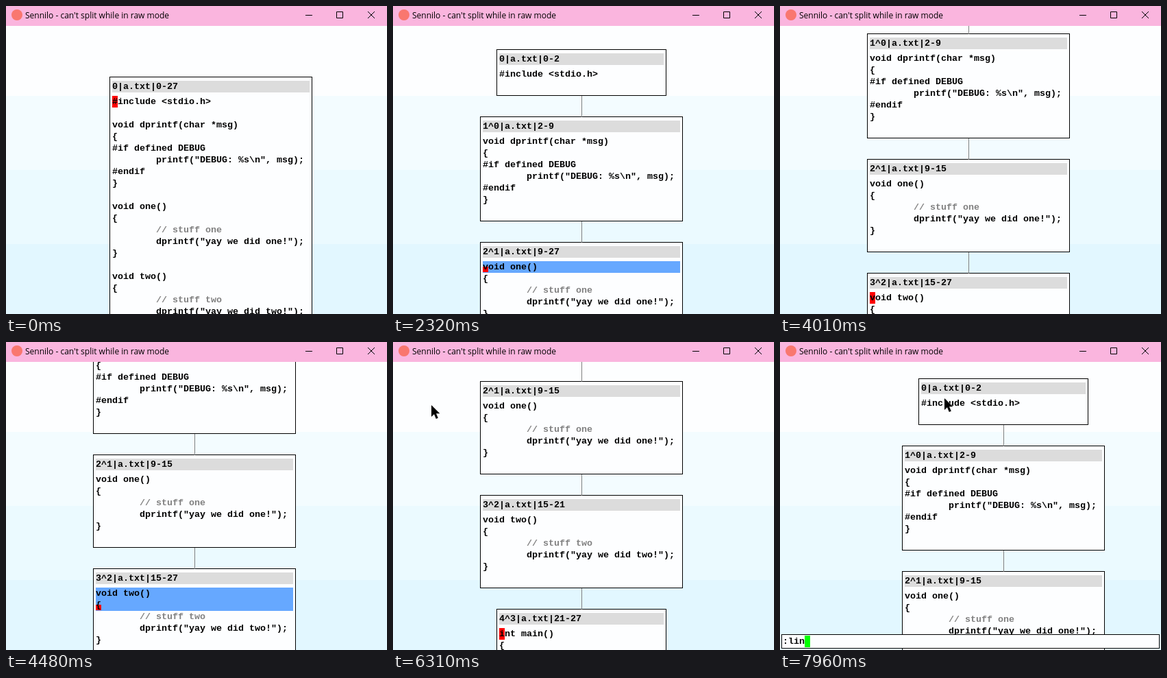
Animation, 556 px wide and 449 px high, one loop 8 s. Source, as an HTML page:

```html
<!DOCTYPE html>
<html lang="en">
<head>
<meta charset="utf-8">
<title>Split editor</title>
<style>
  html, body { margin: 0; width: 100%; height: 100%; overflow: hidden; background: #fff; }
  svg { display: block; }
  text { white-space: pre; }
  .code text { font: bold 13.3333px "Liberation Mono", monospace; }
  .title { font: 12px "Open Sans", "Noto Sans", sans-serif; }
</style>
</head>
<body>
<svg width="556" height="449" viewBox="0 0 556 449">
  <g shape-rendering="crispEdges">
    <rect width="556" height="131" fill="#fdfeff"/>
    <rect y="131" width="556" height="108" fill="#f3fcff"/>
    <rect y="239" width="556" height="108" fill="#ebfaff"/>
    <rect y="347" width="556" height="102" fill="#e2f7ff"/>
  </g>
  <g id="boxes" class="code"></g>
  <g id="command" class="code"></g>
  <rect width="556" height="29" fill="#fab5de"/>
  <circle cx="16" cy="13" r="8" fill="#f9776f"/>
  <text class="title" x="28" y="18">Sennilo - can't split while in raw mode</text>
  <path d="M437 13.5h10M482.5 8.5h9v9h-9zM528 8l10 10M538 8l-10 10" fill="none" stroke="#000"/>
  <path id="mouse" d="M0 0V17L4 13.3 6.8 20 9.8 18.7 7 12.3H12.3Z" stroke="#fff" paint-order="stroke"/>
</svg>
<script>
const LOOP = 8000, CHAR = 8, ROW = 17, PAD = 4, HEAD = 28, GAP = 30;
const LEFT = 151, TOP = 103, LOWEST = 434, KEY = 80, REDRAW = 60;
const TAB = ' '.repeat(8);

const stuff = name => [
  `void ${name}()`, '{', `${TAB}// stuff ${name}`,
  `${TAB}dprintf("yay we did ${name}!");`, '}', ''
];
const LINES = [
  '#include <stdio.h>', '',
  'void dprintf(char *msg)', '{', '#if defined DEBUG',
  TAB + 'printf("DEBUG: %s\\n", msg);', '#endif', '}', '',
  ...stuff('one'), ...stuff('two'),
  'int main()', '{', TAB + 'one();', TAB + 'two();', TAB + 'return 0;', '}'
];
const STARTS = [...LINES.keys()].filter(i => /^(void|int) /.test(LINES[i]));

// Each round scrolls the active box to `top`, selects one function and types a command.
const ROUNDS = [
  { top: 103, reveal: 0, settle: 1, select: 720, done: 1240, colon: 1470, enter: 1770, word: 'spl' },
  { top: 266, reveal: 2080, settle: 3160, select: 2260, done: 2740, colon: 3340, enter: 3760, word: 'spl' },
  { top: 285, reveal: 4010, settle: 5080, select: 4250, done: 4900, colon: 5080, enter: 5500, word: 'spl' },
  { top: 389, reveal: 5620, settle: 5680, select: LOOP, done: LOOP, colon: 7650, enter: 8040, word: 'lin' }
];
const DRAG = { start: 6310, end: 6610, dx: 51, dy: 277 };
const GLIDE = { start: 6650, end: 7090, from: [107, 369], to: [240, 82] };

const clamp = (v, lo, hi) => Math.min(hi, Math.max(lo, v));
const mix = (a, b, p) => a + (b - a) * p;
const easeOut = p => 1 - (1 - p) ** 1.66;
const stepped = (t, a, b) => clamp(Math.floor((t - a) / REDRAW) * REDRAW / (b - a), 0, 1);

function layout(n) {
  const cuts = [0, ...(n ? STARTS.slice(0, n + 1) : []), LINES.length];
  let y = TOP;
  return cuts.slice(0, -1).map((from, i) => {
    const to = cuts[i + 1], lines = LINES.slice(from, to);
    const w = Math.max(30, ...lines.map(s => s.length + 1)) * CHAR + 2 * PAD;
    const h = HEAD + lines.length * ROW + 6;
    const box = { from, to, lines, y, w, h };
    y += h + GAP;
    return box;
  });
}
const LAYOUTS = ROUNDS.map((_, n) => layout(n));
const activeIndex = n => n && n + 1;
const activeBox = n => LAYOUTS[n][activeIndex(n)];
const restingScroll = n => n < 0 ? 0 : ROUNDS[n].top - activeBox(n).y;

function scrollAt(n, t) {
  const { reveal, settle } = ROUNDS[n], before = restingScroll(n - 1);
  if (t < reveal) return before;
  const inView = Math.min(before, LOWEST - (activeBox(n).y + HEAD + ROW));
  return mix(inView, restingScroll(n), easeOut(stepped(t, reveal, settle)));
}

function caretAt(n, t) {
  const { select, done } = ROUNDS[n];
  const first = STARTS[n] - activeBox(n).from;
  if (t < select) return { row: clamp(Math.floor((t - 270) / 180), 0, n ? 0 : first) };
  const moves = STARTS[n + 1] - STARTS[n] - 1;
  const p = clamp((t - select) / (done - select), 0, 1);
  return { row: first + Math.floor(moves * p), anchor: first };
}

const escapeText = s => s.replace(/&/g, '&amp;').replace(/</g, '&lt;');
const rect = (x, y, w, h, fill) =>
  `<rect x="${x}" y="${y}" width="${w}" height="${h}" fill="${fill}"/>`;
const frame = (x, y, w, h) =>
  `<rect x="${x + .5}" y="${y + .5}" width="${w - 1}" height="${h - 1}" fill="#fdfeff" stroke="#000"/>`;
const label = (x, y, s) =>
  `<text x="${x}" y="${y + 12}" fill="${s.trim().startsWith('//') ? '#808080' : '#000'}">${escapeText(s)}</text>`;

function drawCaret(x, top, w, { row, anchor }) {
  const y = top + row * ROW;
  if (anchor === undefined) return rect(x, y, CHAR, ROW, '#f00');
  return rect(x, top + anchor * ROW, w, (row - anchor + 1) * ROW, '#66a8ff')
    + rect(x, y + 8, CHAR, 8, '#f00');
}

function drawBoxes(n, t) {
  const drag = stepped(t, DRAG.start, DRAG.end);
  const dx = Math.round(DRAG.dx * drag);
  const dy = Math.round(scrollAt(n, t) + DRAG.dy * drag);
  const center = LEFT + dx + LAYOUTS[n][0].w / 2;

  return LAYOUTS[n].map((box, i) => {
    const { from, to, lines, w, h } = box;
    const x = center - w / 2 + PAD, y = box.y + dy, inner = w - 2 * PAD;
    const name = i ? `${i}^${i - 1}` : '0';
    return frame(x - PAD, y, w, h)
      + (i ? rect(center, y - GAP, 1, GAP + 1, '#808080') : '')
      + rect(x, y + 6, inner, ROW, '#dcdcdc')
      + label(x, y + 6, `${name}|a.txt|${from}-${to}`)
      + (i === activeIndex(n) ? drawCaret(x, y + HEAD, inner, caretAt(n, t)) : '')
      + lines.map((s, k) => s && label(x, y + HEAD + k * ROW, s)).join('');
  }).join('');
}

function drawCommand(n, t) {
  const { colon, enter, word } = ROUNDS[n];
  if (t < colon) return '';
  const typed = Math.floor((t - enter) / KEY) + word.length + 1;
  const s = ':' + word.slice(0, Math.max(0, typed));
  return frame(2, 426, 552, 21) + label(4, 428, s)
    + rect(4 + s.length * CHAR, 428, CHAR, ROW, '#0f0');
}

function mouseAt(t) {
  const { start, end, from, to } = GLIDE;
  const left = 1 - stepped(t, DRAG.start, DRAG.end), p = stepped(t, start, end);
  return [mix(from[0], to[0], p) - DRAG.dx * left, mix(from[1], to[1], p) - DRAG.dy * left]
    .map(Math.round);
}

const [boxes, command, mouse] = ['boxes', 'command', 'mouse'].map(id => document.getElementById(id));
const shown = new Map();
function update(node, html) {
  if (shown.get(node) === html) return;
  shown.set(node, html);
  node.innerHTML = html;
}

function render(t) {
  const n = ROUNDS.findIndex(round => t < round.enter);
  update(boxes, drawBoxes(n, t));
  update(command, drawCommand(n, t));
  mouse.style.display = t < DRAG.start ? 'none' : '';
  mouse.setAttribute('transform', `translate(${mouseAt(t)})`);
}

const start = performance.now();
function tick() {
  render((performance.now() - start) % LOOP);
  requestAnimationFrame(tick);
}
tick();
</script>
</body>
</html>
```
